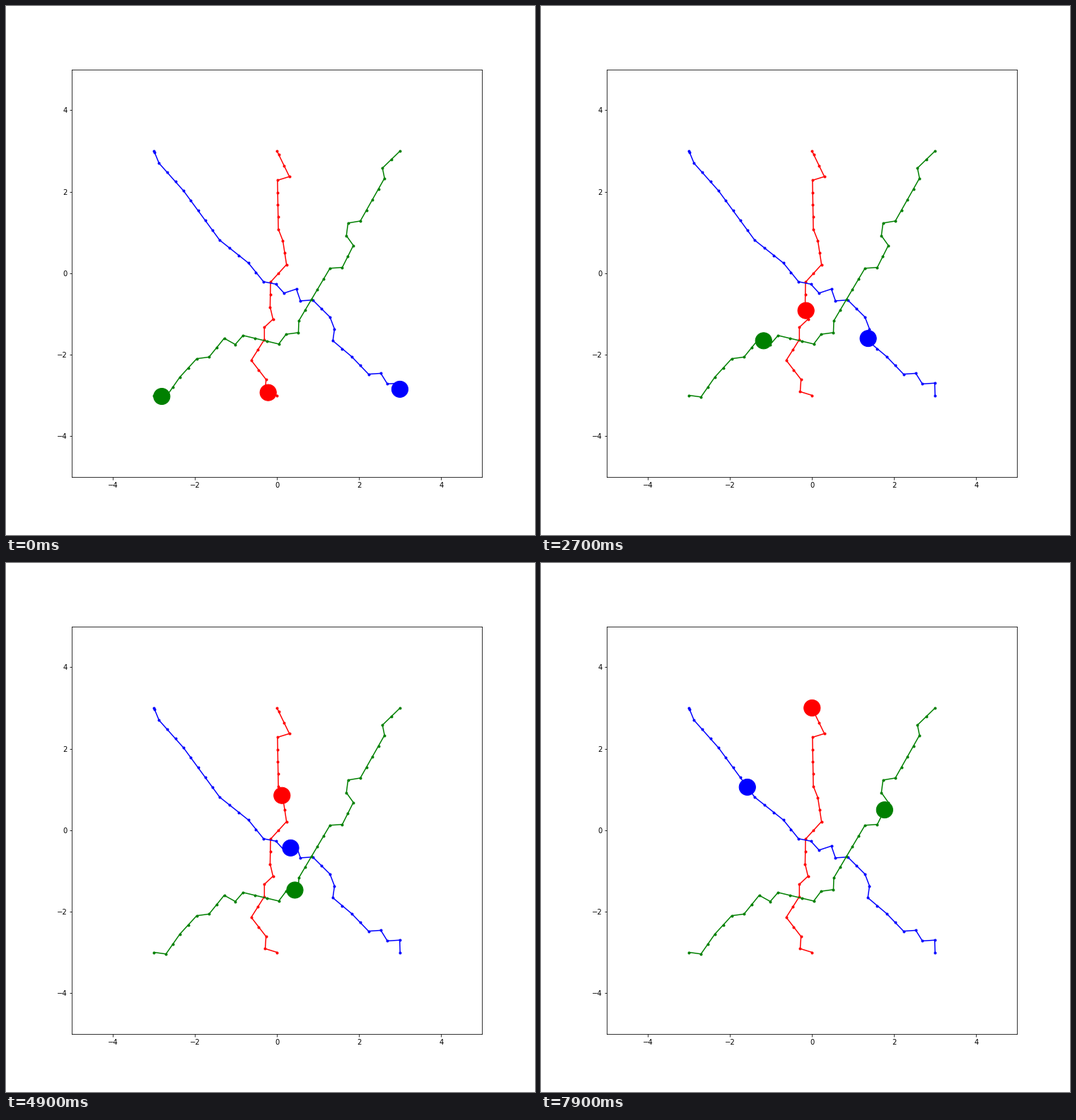
Recreate the animation shown at these times as a matplotlib script. Size 748 px wide and 748 px high, loop 8000 ms.

```python
import numpy as np
import matplotlib.pyplot as plt
from matplotlib.animation import FuncAnimation

SIZE, DPI = 748, 72
FRAMES, INTERVAL = 80, 100
STEP = 0.3  # spacing of the waypoints along every path

# Corners only; the waypoints between them are filled in at even steps.
RED = [(0, -3), (-.29, -2.91), (-.27, -2.61), (-.63, -2.14), (-.31, -1.63),
       (-.31, -1.33), (-.10, -1.13), (-.17, -.83), (-.16, -.22), (.23, .21),
       (.14, .80), (.03, 1.08), (.01, 2.28), (.30, 2.37), (.04, 2.91), (0, 3)]

BLUE = [(3, -3), (2.99, -2.70), (2.69, -2.72), (2.53, -2.46), (2.23, -2.48),
        (1.82, -2.05), (1.36, -1.66), (1.40, -1.37), (1.29, -1.08),
        (.87, -.66), (.57, -.68), (.47, -.39), (.17, -.49), (-.03, -.27),
        (-.33, -.21), (-.70, .25), (-1.40, .81), (-2.28, 2.02),
        (-2.88, 2.70), (-2.99, 2.97), (-3, 3)]

GREEN = [(-3, -3), (-2.71, -3.04), (-2.37, -2.55), (-1.96, -2.10),
         (-1.66, -2.06), (-1.29, -1.60), (-1.02, -1.75), (-.83, -1.53),
         (.04, -1.74), (.22, -1.50), (.52, -1.46), (.53, -1.17), (1.29, .12),
         (1.59, .14), (1.86, .68), (1.69, .92), (1.73, 1.23), (2.03, 1.28),
         (2.62, 2.33), (2.57, 2.58), (3, 3)]


def waypoints(corners):
    corners = np.array(corners, float)
    path = [corners[0]]
    for a, b in zip(corners, corners[1:]):
        n = max(1, round(np.hypot(*(b - a)) / STEP))
        path += [a + (b - a) * k / n for k in range(1, n + 1)]
    return np.array(path)


class Walker:
    """A disc that follows its path at a steady pace, in waypoints per frame."""

    def __init__(self, ax, color, corners, lead, pace):
        self.path = waypoints(corners)
        self.lead, self.pace = lead, pace
        ax.plot(*self.path.T, color=color, marker=".")
        self.disc = ax.add_patch(plt.Circle(self.path[0], 0.2, color=color))

    def move(self, frame):
        u = self.lead + self.pace * frame
        index = np.arange(len(self.path))
        self.disc.center = tuple(np.interp(u, index, axis) for axis in self.path.T)
        return self.disc


fig, ax = plt.subplots(figsize=(SIZE / DPI, SIZE / DPI), dpi=DPI)
fig.subplots_adjust(left=0.1249, right=0.9, bottom=0.11, top=0.88)
ax.set(xlim=(-5, 5), ylim=(-5, 5),
       xticks=range(-4, 5, 2), yticks=range(-4, 5, 2))

walkers = [Walker(ax, "red", RED, 0.75, 0.2945),
           Walker(ax, "blue", BLUE, 0.5, 0.285),
           Walker(ax, "green", GREEN, 0.65, 0.287)]


def update(frame):
    return [w.move(frame) for w in walkers]


anim = FuncAnimation(fig, update, frames=FRAMES, interval=INTERVAL,
                     repeat=True, repeat_delay=0, blit=False)
plt.show()
```
